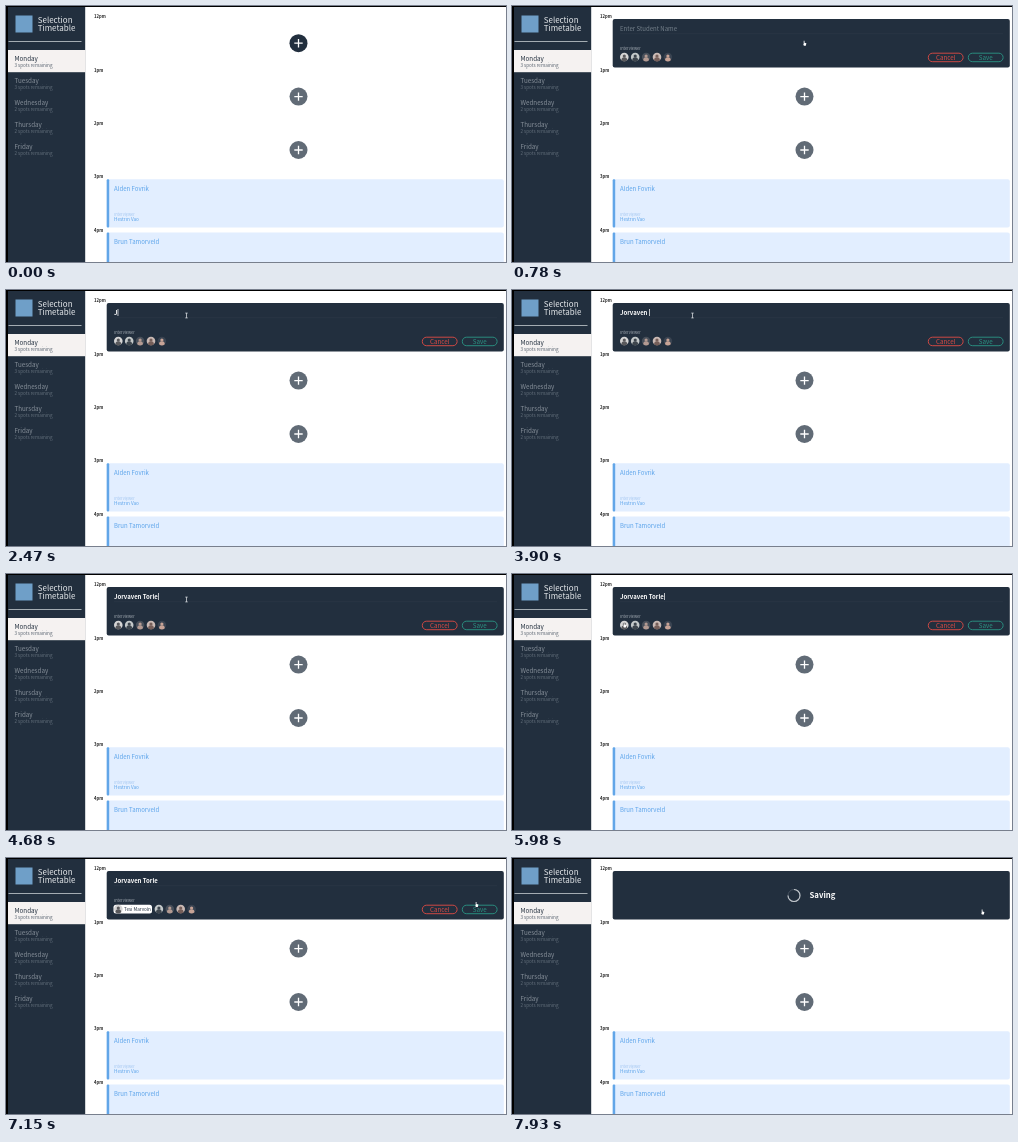
These frames come from a looping animation (500x256 px, 8 s). An HTML page:

```html
<!DOCTYPE html>
<html lang="en">
<head>
<meta charset="utf-8">
<title>Appointment booking</title>
<style>
  html, body { margin: 0; width: 100%; height: 100%; overflow: hidden; background: #fff; }
  svg { display: block; width: 100vw; height: 100vh; }
  text { font-family: "Noto Sans CJK JP", "Noto Sans CJK SC", "Noto Sans CJK", "Noto Sans", sans-serif; white-space: pre; }
</style>
</head>
<body>
<svg id="stage" viewBox="0 0 500 256">
  <g id="page"></g>
  <g id="addButtons"></g>
  <g id="form">
    <rect x="100.7" y="13" width="397.1" height="48.4" rx="2" fill="#222f3e"/>
    <g id="fields">
      <path d="M108 27.7H491" stroke="#2c3947" stroke-width=".6"/>
      <text id="placeholder" x="108" y="24.8" font-size="6.05" fill="#75808b">Enter Student Name</text>
      <text id="student" x="108" y="24.8" font-size="6" font-weight="700" fill="#fff"></text>
      <rect id="caret" y="19" width=".7" height="7" fill="#fff"/>
      <text x="108" y="43.5" font-size="3.9" fill="#a5adb5">Interviewer</text>
      <g id="chosen">
        <rect x="107.5" y="46.7" width="38.5" height="8.8" rx="2.5" fill="#fff"/>
        <text x="118" y="52.8" font-size="4.6" fill="#222f3e">Tesi Marvoln</text>
      </g>
      <g id="avatars"></g>
      <g id="buttons" text-anchor="middle"></g>
    </g>
    <g id="saving">
      <circle cx="282" cy="37.5" r="6" fill="none" stroke="#46515e"/>
      <path id="spinner" d="M282 31.5a6 6 0 1 1 -6 6" fill="none" stroke="#c3c8cd" stroke-width="1.1"/>
      <text x="297.5" y="40.3" font-size="7.8" font-weight="700" fill="#fff">Saving</text>
    </g>
  </g>
  <g id="cursor">
    <path id="beam" d="M-1.2-2.4H1.2M0-2.4V2.4M-1.2 2.4H1.2" stroke="#e8ebee" stroke-width=".7"/>
    <path id="hand" d="M-.8-2.6L-.8 1.2L-1.6.5L-.6 2.4H1.3L1.9 0L0-.6L0-2.6Z" fill="#fff"/>
  </g>
</svg>
<script>
const $ = id => document.getElementById(id);
const show = (id, on) => $(id).setAttribute("display", on ? "inline" : "none");

const rect = (x, y, w, h, fill, rx = 0) =>
  `<rect x="${x}" y="${y}" width="${w}" height="${h}" rx="${rx}" fill="${fill}"/>`;
const label = (x, y, size, fill, str, weight = 400) =>
  `<text x="${x}" y="${y}" font-size="${size}" fill="${fill}" font-weight="${weight}">${str}</text>`;

const LOOP = 8000, STEP = 130, PITCH = 53.4, NAVY = "#222f3e";
const STUDENT = "Jorvaven Torle";
const OPEN = 650, FOCUS = 1560, BLINK = 1820, CHOOSE = 6110, SAVE = 7410;

// Moment of each change to the typed text, and its length from then on.
const KEYS = [[2470, 1], [2730, 2], [2860, 3], [3120, 4], [3250, 5], [3380, 6], [3510, 8],
  [3900, 9], [4030, 10], [4160, 11], [4420, 12], [4550, 13], [4680, 14]];

// Pointer stops: time, x, y.
const STOPS = [[0, 292.5, 37.3], [1040, 292.5, 37.3], [1300, 181.5, 26], [1560, 180.5, 25.5],
  [5200, 180.5, 25.5], [5980, 112.5, 51], [6110, 112.5, 51], [7020, 470.5, 46.5],
  [7280, 470.5, 46.5], [7670, 470.5, 54], [LOOP, 470.5, 54]];

function sidebar() {
  const days = [["Monday", 3], ["Tuesday", 3], ["Wednesday", 2], ["Thursday", 2], ["Friday", 2]];
  return rect(0, 0, 79, 256, NAVY) + rect(0, 0, 2, 256, "#000") +
    rect(79, 0, 1, 256, "#d3d6d9") +
    rect(9.5, 9.5, 17, 17, "#6f9fc8") +
    label(31.7, 17, 8, "#e6e9ec", "Selection", 300) +
    label(31.7, 25, 8, "#e6e9ec", "Timetable", 300) +
    rect(2.5, 35, 73, .9, "#b4bac0") +
    rect(2, 44, 77.5, 22.2, "#f5f2f1") +
    days.map(([day, spots], i) => {
      const y = 54.8 + i * 22.1;
      return label(8.5, y, 6.25, i ? "#87909a" : NAVY, day) +
        label(8.5, y + 6, 4.6, i ? "#64707c" : "#596470", `${spots} spots remaining`, i ? 300 : 400);
    }).join("");
}

function card(slot, name, interviewer) {
  const y = 13 + slot * PITCH;
  return rect(100.7, y, 397.1, 48.4, "#e2eeff", 2) + rect(100.7, y, 2.5, 48.4, "#62a6e8", 1) +
    label(108, y + 11.4, 6.05, "#5aa3ea", name) +
    label(108, y + 36.3, 3.9, "#a3c6f0", "Interviewer") +
    label(108, y + 41.8, 4.7, "#5aa3ea", interviewer);
}

function schedule() {
  const hours = ["12pm", "1pm", "2pm", "3pm", "4pm"].map((hour, i) =>
    label(88, 12.1 + i * PITCH, 4.2, "#222", hour, 700));
  return hours.join("") + card(3, "Alden Fovrik", "Hestrin Vao") +
    card(4, "Brun Tamorveld", "Oslen Darvi");
}

const addButton = i => `<g transform="translate(292.5 ${37.2 + i * PITCH})">
  <circle r="9" fill="${i ? "#616b76" : NAVY}"/>
  <path d="M-4.2 0H4.2M0-4.2V4.2" stroke="#fff" stroke-width="1.3"/></g>`;

const avatar = ([back, body]) => `<g><circle r="4.3" fill="${back}"/>
  <circle cy="-1" r="1.6" fill="${body}"/><path d="M-2.9 3.2a2.9 2.9 0 0 1 5.8 0A4.3 4.3 0 0 1-2.9 3.2" fill="${body}"/></g>`;

const button = (x, color, name) =>
  `<rect x="${x}" y="47.2" width="34.8" height="8.5" rx="4.2" fill="none" stroke="${color}" stroke-width=".9"/>` +
  label(x + 17.4, 53.8, 6.2, color, name);

$("page").innerHTML = rect(0, 0, 500, 256, "#fff") + schedule() + sidebar() +
  rect(0, 0, 500, 1, "#000");
$("addButtons").innerHTML = [0, 1, 2].map(addButton).join("");
$("avatars").innerHTML = [["#d5d5d5", "#59595c"], ["#c3c8c9", "#3d454d"], ["#474f5a", "#b39a92"],
  ["#c9b9b4", "#755e59"], ["#394351", "#c7a396"]].map(avatar).join("");
$("buttons").innerHTML = button(416.3, "#df4b45", "Cancel") + button(456.3, "#2b9685", "Save");

function pointerAt(t) {
  const i = Math.max(1, STOPS.findIndex(s => s[0] >= t));
  const [t0, x0, y0] = STOPS[i - 1], [t1, x1, y1] = STOPS[i];
  const k = (t - t0) / (t1 - t0), ease = k * k * (3 - 2 * k);
  return [x0 + (x1 - x0) * ease, y0 + (y1 - y0) * ease];
}

function draw(time) {
  const t = Math.floor((time % LOOP) / STEP) * STEP;
  const chosen = t >= CHOOSE, saving = t >= SAVE;

  show("form", t >= OPEN);
  show("fields", !saving);
  show("saving", saving);
  show("chosen", chosen);

  const typed = KEYS.reduce((n, [at, length]) => t >= at ? length : n, 0);
  $("student").textContent = STUDENT.slice(0, typed);
  show("placeholder", !typed);
  show("caret", !chosen && (typed > 0 || (t >= FOCUS && t < BLINK)));
  $("caret").setAttribute("x", 108.2 + (typed ? $("student").getComputedTextLength() : 0));

  [...$("avatars").children].forEach((el, i) => {
    const x = 112.3 + i * 10.9 + (chosen && i ? 29.7 : 0);
    el.setAttribute("transform", `translate(${x} 51)`);
  });

  const [x, y] = pointerAt(t);
  const overInput = t >= OPEN && y < 30;
  $("cursor").setAttribute("transform", `translate(${x} ${y})`);
  show("beam", overInput);
  show("hand", t >= OPEN && !overInput);

  // The spinner rests between 7670 and 7930 ms.
  const turn = (Math.min(t, 7670) + (t >= 7930 ? 260 : 0) - 7930) * .36;
  $("spinner").setAttribute("transform", `rotate(${turn} 282 37.5)`);
}

const start = performance.now();
function tick() {
  draw(performance.now() - start);
  requestAnimationFrame(tick);
}
tick();
</script>
</body>
</html>
```
